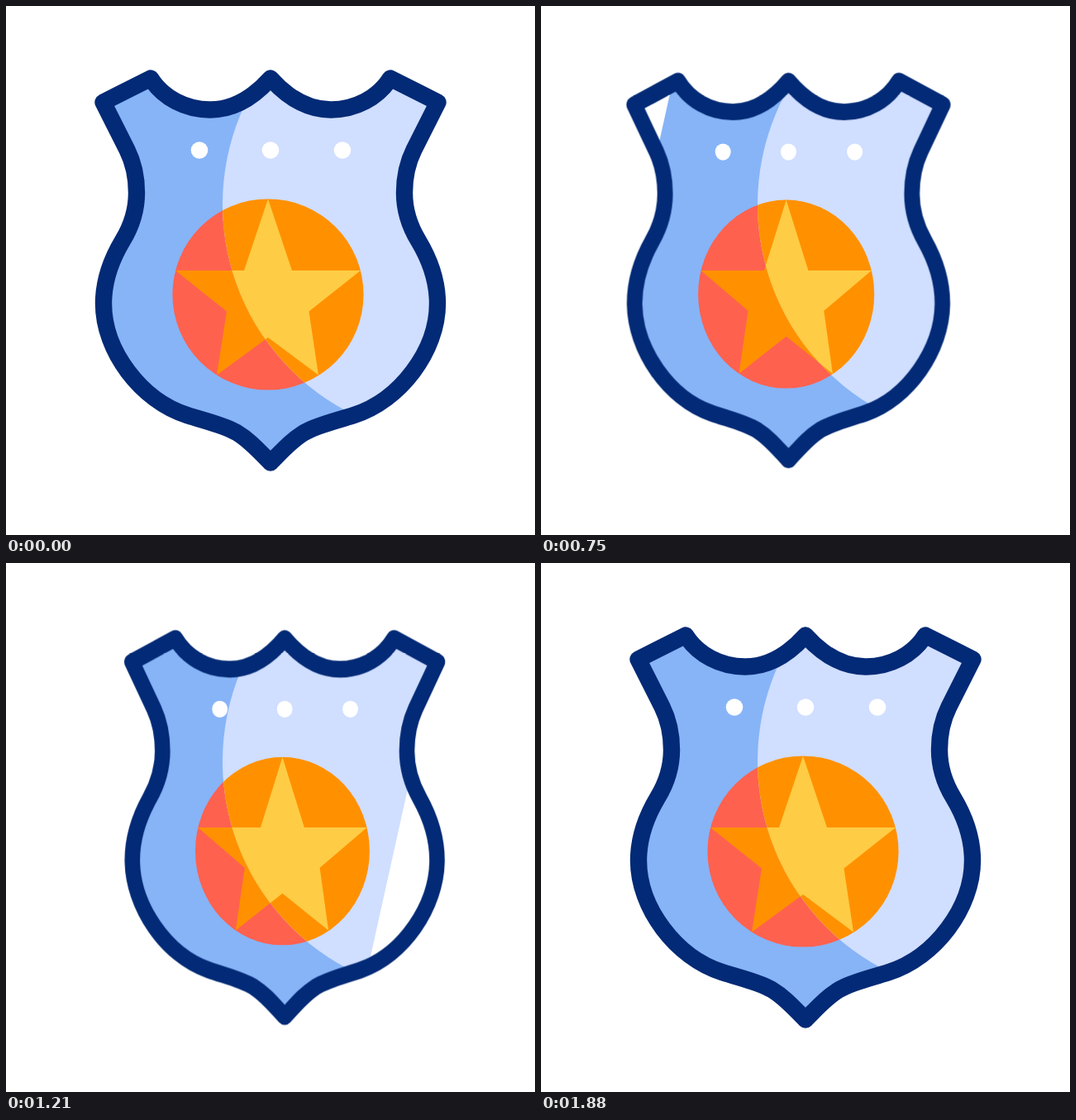
Write an HTML page without scripts that moves like this. It is 640 by 640 pixels and loops after 2 s.

```html
<!DOCTYPE html>
<html lang="en">
<head>
<meta charset="utf-8">
<title>Badge</title>
<style>
html, body { margin: 0; width: 100%; height: 100%; overflow: hidden; background: #fff; }
svg { display: block; width: 100%; height: 100%; }

.pose {
  transform-origin: 320px 320px;
  animation: sway 2s linear infinite, squash 2s cubic-bezier(.333, 0, .667, 1) infinite;
}
@keyframes sway {
  0%, 6.5% { translate: 0; }
  11% { translate: -1px; }
  14.5% { translate: -2.6px; }
  18.5% { translate: -5.2px; }
  21.5% { translate: -8px; }
  24% { translate: -10.8px; }
  27% { translate: -14.5px; }
  29.5% { translate: -17.6px; }
  31.5% { translate: -19.7px; }
  33.5% { translate: -21.3px; }
  35.5% { translate: -21.8px; }
  38% { translate: -20.3px; }
  41% { translate: -16.4px; }
  44% { translate: -11px; }
  47% { translate: -5.6px; }
  50% { translate: -.5px; }
  54% { translate: 6px; }
  58.5% { translate: 12.5px; }
  62% { translate: 20.5px; }
  64.5% { translate: 26.5px; }
  66.5% { translate: 29.7px; }
  67.75% { translate: 30.2px; }
  69% { translate: 29.5px; }
  71% { translate: 27px; }
  74% { translate: 21.5px; }
  76.5% { translate: 16.3px; }
  79% { translate: 11.5px; }
  82% { translate: 7.2px; }
  85.5% { translate: 4px; }
  89% { translate: 1.6px; }
  94%, 100% { translate: 0; }
}
@keyframes squash {
  0%, 18%, 82%, 100% { scale: 1 1; }
  48.75%, 51.25% { scale: .888 .98; }
}

/* slanted glare bands: left edge and width both change */
.band { fill: #fff; transform-origin: 0 0; animation: 2s linear infinite; }
.trail { animation-name: trail; }
.lead { animation-name: lead; }
@keyframes trail {
  0%, 35% { transform: translateX(-15.4px) skewX(-12.52deg) scaleX(6); }
  65%, 100% { transform: translateX(644.6px) skewX(-12.52deg) scaleX(159); }
}
@keyframes lead {
  0%, 35% { transform: translateX(16.8px) skewX(-12.52deg) scaleX(73); }
  65%, 100% { transform: translateX(892.8px) skewX(-12.52deg) scaleX(253); }
}
</style>
</head>
<body>
<svg viewBox="0 0 640 640">
  <defs>
    <clipPath id="lit"><circle cx="545.5" cy="240" r="283.5"/></clipPath>
    <circle id="disc" cx="317" cy="349" r="115.6"/>
    <path id="star" d="M317 233.5L346 320H429L366.5 369.5L378 446.5L317 401L255 446.5L267 369.5L205 320H288Z"/>
  </defs>

  <rect width="640" height="640" fill="#86b4f7"/>
  <g class="pose">
    <use href="#disc" fill="#ff614f"/>
    <use href="#star" fill="#ff9100"/>
  </g>

  <g clip-path="url(#lit)">
    <rect width="640" height="640" fill="#d0deff"/>
    <g class="pose">
      <use href="#disc" fill="#ff9100"/>
      <use href="#star" fill="#ffcc45"/>
    </g>
  </g>

  <g class="pose" fill="#fff">
    <circle cx="234" cy="174.5" r="10.3"/>
    <circle cx="320" cy="174.5" r="10.3"/>
    <circle cx="407" cy="174.5" r="10.3"/>
  </g>

  <rect class="band trail" width="1" height="640"/>
  <rect class="band lead" width="1" height="640"/>

  <!-- white surround with the shield cut out, plus its outline -->
  <path class="pose" fill="#fff" fill-rule="evenodd" stroke="#032a76" stroke-width="20.4" stroke-linejoin="round"
    d="M-400-400H1040V1040H-400Z
       M320 552.5C306 538.5 295 525.5 279 516C262 506.5 242 502.5 219 495
       C163 477 118 417 118 360C118 333 126 309 141 284C152 266 158 246 158 226
       C158 207 154 189 146.5 174L117.5 116.5L175 87.5
       C190 111 217 125.5 247 125.5C276 125.5 299 111 320 87.5
       C341 111 364 125.5 393 125.5C423 125.5 450 111 465 87.5
       L522.5 116.5L493.5 174C486 189 482 207 482 226
       C482 246 488 266 499 284C514 309 522 333 522 360
       C522 417 477 477 421 495C398 502.5 378 506.5 361 516
       C345 525.5 334 538.5 320 552.5Z"/>
</svg>
</body>
</html>
```
